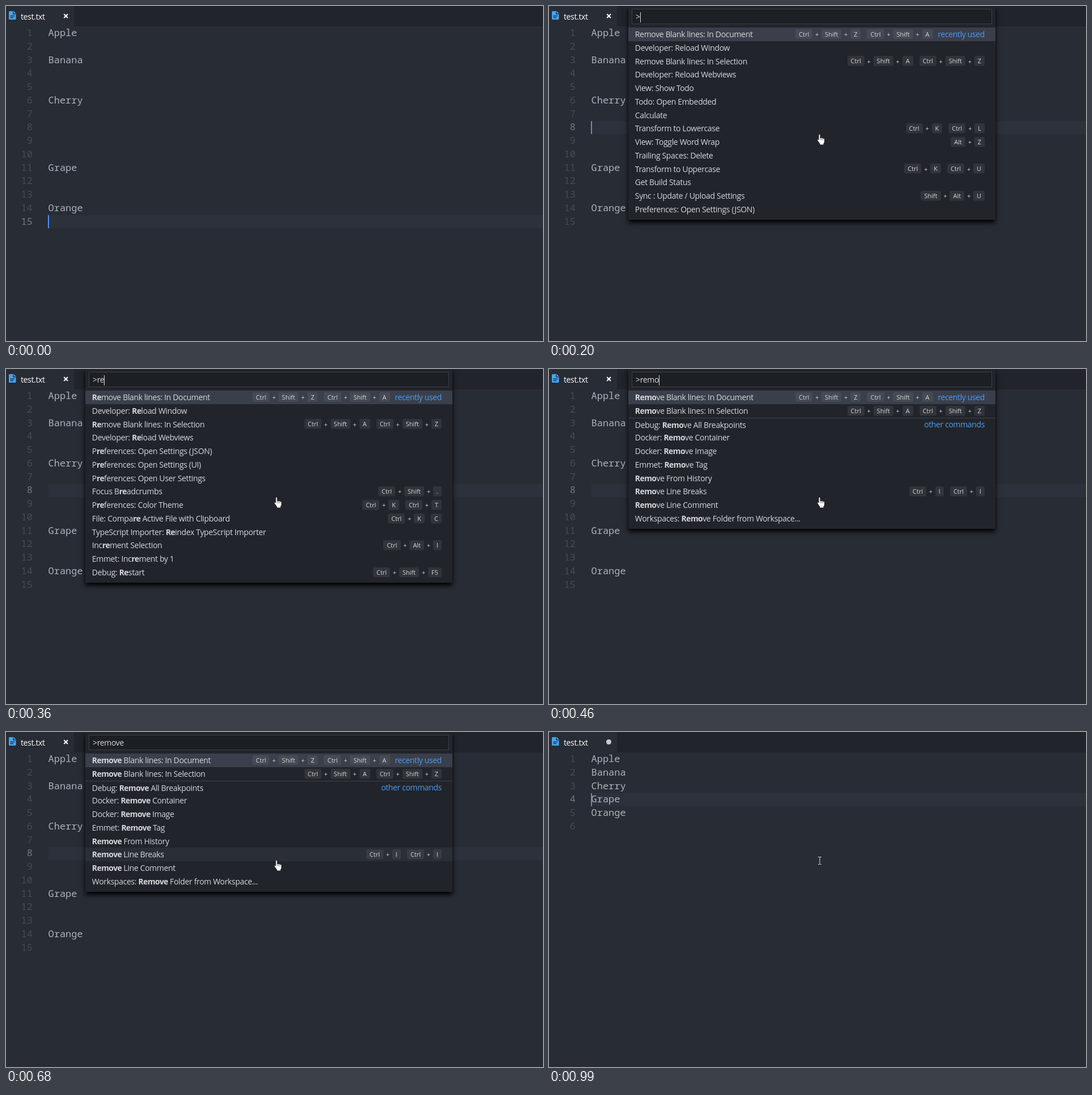
Animation, 948 px wide and 591 px high, one loop 1.23 s. Source, as an HTML page:

```html
<!DOCTYPE html>
<html lang="en">
<head>
<meta charset="utf-8">
<title>Remove blank lines</title>
<style>
html, body { margin: 0; width: 100%; height: 100%; overflow: hidden; background: #282c34; }
body { position: relative; font: 14px "Open Sans", "Noto Sans", sans-serif; letter-spacing: -.34px; }
body div, body svg { position: absolute; box-sizing: border-box; white-space: pre; }
#bar { left: 120px; right: 0; height: 36px; background: #21252b; }
#tab { left: 26px; top: 0; line-height: 37px; color: #fff; }
#active { left: 75px; right: 0; height: 23.5px; background: #2c313c; }
#code { left: 0; top: 35.2px; }
#code div { font: 17px/23.75px "Noto Sans Mono", "DejaVu Sans Mono", monospace; letter-spacing: 0; color: #abb2bf; }
#code .num { left: 0; width: 47px; text-align: right; color: #454b57; }
#code .on { color: #737984; }
#caret { left: 74px; width: 2px; height: 23.5px; background: #528bff; }
#popup { left: 140px; top: 0; width: 648px; background: #21252b; color: #d4d6da; box-shadow: 0 5px 8px #000; }
#input { left: 6px; top: 5px; width: 636px; height: 27px; padding-left: 6px; line-height: 26px;
  background: #1c1f23; border: 1px solid #3c4047; }
#input i { display: inline-block; width: 1px; height: 18px; vertical-align: middle; background: #ddd; }
#popup .row { left: 0; width: 100%; height: 23.75px; padding-left: 11.8px; line-height: 23.75px; }
#popup .sep { border-top: 1px solid #3d4148; }
#popup b { font-weight: 700; letter-spacing: -.57px; }
#popup .right { right: 19px; top: 0; height: 100%; display: flex; align-items: center; font-size: 11px; letter-spacing: 0; }
.right kbd { font: inherit; line-height: 18px; padding: 0 6px; border-radius: 3px; background: rgba(128,128,128,.17);
  box-shadow: inset 0 -1px rgba(20,22,26,.25); }
.right u { text-decoration: none; margin: 0 4.8px; }
.right s { width: 11px; }
.right em { font: 14px "Open Sans", "Noto Sans", sans-serif; letter-spacing: -.37px; color: #4a9cf6; margin-left: 9px; }
svg { left: 0; top: 0; }
</style>
</head>
<body>
<div id="bar"></div>
<div id="tab">test.txt</div>
<div id="active"></div>
<div id="code"></div>
<div id="caret"></div>
<div id="popup"></div>
<svg width="948" height="591">
  <path d="M6.5 9h7l4 4v9.5q0 1.5-1.5 1.5H6.5Q5 24 5 22.500v-12Q5 9 6.500 9z" fill="#42a5f5"/>
  <path d="M13 10v4h4M7.500 17.500h7.500M7.500 20.500h5.500" fill="none" stroke="#282c34" stroke-width="1.400"/>
  <path id="close" d="M102.300 14.300l6.700 6.700M109 14.300l-6.700 6.700" stroke="#fff" stroke-width="2"/>
  <circle id="dot" cx="105.500" cy="17.500" r="4.500" fill="#c9cbce"/>
  <path id="beam" d="M475 220.500h2.300l.7.700.7-.7h2.300M478 221v12M475 233.500h2.300l.7-.7.7.7h2.300" fill="none" stroke="#d5d7da"/>
  <g id="hand">
    <path d="M476 228q0-2 1.500-2t1.500 2v5q1-1.200 2.500 0 1.500-1 2.500.4 2.500-.4 2.500 2v3.600q0 2-1.500 3.500V245h-7v-2l-4-5.500q-1-2 .5-2.500l1.500 1z"
      fill="#fff" stroke="#1a1c20"/>
    <path d="M479 233v4M481.600 233.500v3.500M484 234v3" stroke="#555" stroke-width=".8"/>
  </g>
</svg>
<script>
const LOOP = 1230, PITCH = 23.75;
const $ = id => document.getElementById(id);

const full = ["Apple", "", "Banana", "", "", "Cherry", "", "", "", "", "Grape", "", "", "Orange", ""];
const packed = [...full.filter(Boolean), ""];

// Each row: text; shortcut chords; label on the right
const inDoc = "Remove Blank lines: In Document;Ctrl Shift Z|Ctrl Shift A;recently used";
const inSel = "Remove Blank lines: In Selection;Ctrl Shift A|Ctrl Shift Z";
const recent = [inDoc, "Developer: Reload Window", inSel, "Developer: Reload Webviews", "View: Show Todo",
  "Todo: Open Embedded", "Calculate", "Transform to Lowercase;Ctrl K|Ctrl L", "View: Toggle Word Wrap;Alt Z",
  "Trailing Spaces: Delete", "Transform to Uppercase;Ctrl K|Ctrl U", "Get Build Status",
  "Sync : Update / Upload Settings;Shift Alt U", "Preferences: Open Settings (JSON)"];
const loose = [inDoc, "Developer: Reload Window", inSel, "Developer: Reload Webviews",
  "Preferences: Open Settings (JSON)", "Preferences: Open Settings (UI)", "Preferences: Open User Settings",
  "Focus Breadcrumbs;Ctrl Shift .", "Preferences: Color Theme;Ctrl K|Ctrl T",
  "File: Compare Active File with Clipboard;Ctrl K|C", "TypeScript Importer: Reindex TypeScript Importer",
  "Increment Selection;Ctrl Alt I", "Emmet: Increment by 1", "Debug: Restart;Ctrl Shift F5"];
const strict = [inDoc, inSel, "Debug: Remove All Breakpoints;;other commands", "Docker: Remove Container",
  "Docker: Remove Image", "Emmet: Remove Tag", "Remove From History", "Remove Line Breaks;Ctrl I|Ctrl I",
  "Remove Line Comment", "Workspaces: Remove Folder from Workspace..."];

// Start time, active line, mouse, and the palette's query, rows, caret and hovered row
const steps = [
  { at: 0, line: 15, caret: 1 },
  { at: 20, line: 8, caret: 1, mouse: "beam" },
  { at: 200, line: 8, caret: 1, mouse: "hand", query: "", rows: recent, typing: 1 },
  { at: 230, line: 8, mouse: "hand", query: "", rows: recent, typing: 1 },
  { at: 300, line: 8, mouse: "hand", query: "r", rows: loose, typing: 1 },
  { at: 360, line: 8, mouse: "hand", query: "re", rows: loose, typing: 1 },
  { at: 460, line: 8, mouse: "hand", query: "remo", rows: strict, typing: 1 },
  { at: 490, line: 8, mouse: "hand", query: "remov", rows: strict, typing: 1, hover: 7 },
  { at: 570, line: 8, mouse: "hand", query: "remove", rows: strict, typing: 1, hover: 7 },
  { at: 680, line: 8, mouse: "hand", query: "remove", rows: strict, hover: 7 },
  { at: 820, line: 8, caret: 1, mouse: "beam" },
  { at: 880, line: 4, caret: 1, mouse: "beam", saved: false }
];

const chord = keys => keys.split(" ").map(k => `<kbd>${k}</kbd>`).join("<u>+</u>");

function rowHtml(row, i, { query, hover }) {
  const [text, keys, label] = row.split(";");
  const name = query ? text.replace(new RegExp(query, "i"), "<b>$&</b>") : text;
  const fill = i === 0 ? "#3a3f4b" : i === hover ? "#2a2e36" : "none";
  const right = (keys ? keys.split("|").map(chord).join("<s></s>") : "") + (label ? `<em>${label}</em>` : "");
  return `<div class="row${label && i ? " sep" : ""}" style="top:${38 + i * PITCH}px;background:${fill}">` +
    `${name}<div class="right">${right}</div></div>`;
}

const show = (id, on) => $(id).style.display = on ? "" : "none";
const lineTop = n => 36.25 + (n - 1) * PITCH;

function render(s) {
  const edited = s.saved === false;
  $("code").innerHTML = (edited ? packed : full).map((text, i) => {
    const top = `style="top:${i * PITCH}px`;
    return `<div class="num${i + 1 === s.line ? " on" : ""}" ${top}">${i + 1}</div><div ${top};left:74.5px">${text}</div>`;
  }).join("");
  $("active").style.top = lineTop(s.line) + "px";
  show("close", !edited);
  show("dot", edited);
  show("caret", s.caret);
  show("beam", s.mouse === "beam");
  show("hand", s.mouse === "hand");
  show("popup", s.rows);
  if (!s.rows) return;
  $("popup").style.height = 44.5 + s.rows.length * PITCH + "px";
  $("popup").innerHTML = `<div id="input">&gt;${s.query}${s.typing ? "<i></i>" : ""}</div>` +
    s.rows.map((row, i) => rowHtml(row, i, s)).join("");
}

// The caret glides to a new line
function caretLine(t) {
  const glide = (from, to, start) => {
    const p = Math.min(1, (t - start) / 80);
    return to + (from - to) * (1 - p) ** 3;
  };
  return t < 20 ? 15 : t < 880 ? glide(15, 8, 20) : glide(8, 4, 880);
}

let current;
function frame(now) {
  const t = now % LOOP;
  const step = steps.findLast(s => s.at <= t);
  if (step !== current) render(current = step);
  $("caret").style.top = lineTop(caretLine(t)) + "px";
  requestAnimationFrame(() => frame(performance.now() - start));
}
const start = performance.now();
frame(0);
</script>
</body>
</html>
```
